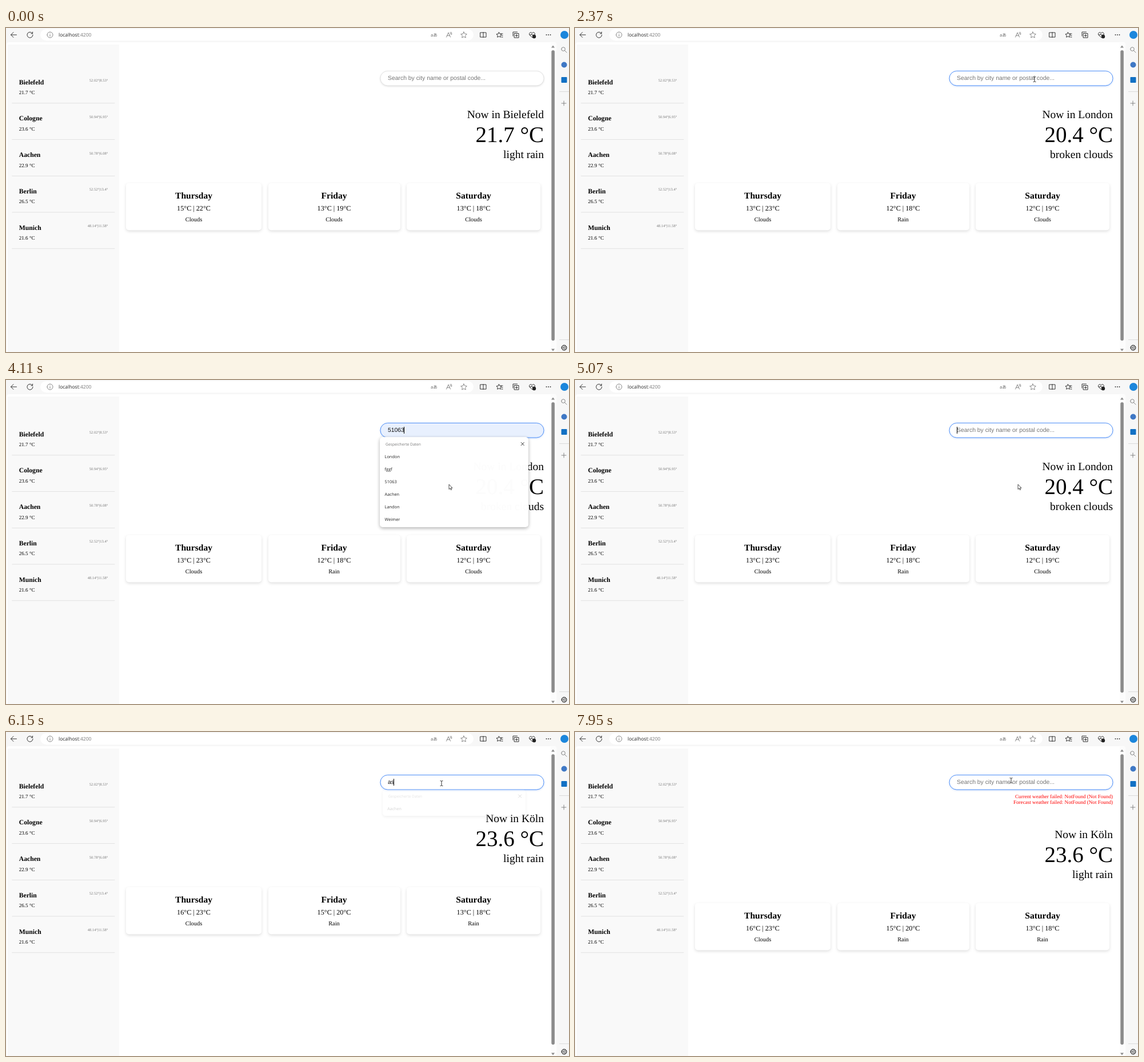
Write an HTML page that moves like this. It is 985 by 568 pixels and loops after 8 s.

```html
<!DOCTYPE html>
<html lang="en">
<head>
<meta charset="utf-8">
<title>Weather search</title>
<style>
html, body { margin: 0; width: 100%; height: 100%; overflow: hidden; background: #fff; }
svg { display: block; }
text { text-rendering: geometricPrecision; font-family: "Liberation Serif", "Times New Roman", serif; white-space: pre; }
.ui text { font-family: "Open Sans", "Noto Sans", sans-serif; }
#typed { font: 10.4px "Liberation Sans", Arial, sans-serif; }
.icon { fill: none; stroke: #333; stroke-width: 1; stroke-linecap: round; stroke-linejoin: round; }
.soft { stroke: #6b6b6b; stroke-width: .8; }
.end { text-anchor: end; }
.mid { text-anchor: middle; }
.card { fill: #fff; filter: drop-shadow(0 2.4px 2.4px rgba(0,0,0,.13)); }
#field { filter: drop-shadow(0 1.3px 1.8px rgba(0,0,0,.13)); stroke: #dcdcdc; stroke-width: .8; }
#field.focus { stroke: #4f8ff7; stroke-width: 1; filter: drop-shadow(0 1.3px 1.8px rgba(60,130,240,.28)); }
#panel { filter: drop-shadow(0 2.5px 3px rgba(0,0,0,.32)); }
</style>
</head>
<body>
<svg id="stage" width="985" height="568" viewBox="0 0 985 568"></svg>
<script>
const LOOP = 8000;
const CITIES = [
  ['Bielefeld', '21.7', '52.02°|8.53°'],
  ['Cologne', '23.6', '50.94°|6.95°'],
  ['Aachen', '22.9', '50.78°|6.08°'],
  ['Berlin', '26.5', '52.52°|13.4°'],
  ['Munich', '21.6', '48.14°|11.58°']
];
const CARDS = [['Thursday', 210, 447, 328.5], ['Friday', 459, 690, 574], ['Saturday', 701, 935, 818]];
const SAVED = ['London', 'fggf', '51063', 'Aachen', 'Landon', 'Weimer'];
const PROMPT = 'Search by city name or postal code...';

// Timelines: each entry holds from its first value (ms) on
const WEATHER = [
  [0, 'Bielefeld', '21.7', 'light rain', '15 22 Clouds', '13 19 Clouds', '13 18 Clouds'],
  [2280, 'London', '20.4', 'broken clouds', '13 23 Clouds', '12 18 Rain', '12 19 Clouds'],
  [5100, 'Köln', '23.6', 'light rain', '16 23 Clouds', '15 20 Rain', '13 18 Rain']
];
const TYPED = [
  [0, ''], [1380, 'L'], [1500, 'Lo'], [1620, 'Lon'], [1860, 'Lond'], [1950, 'Londo'], [2010, 'London'],
  [2250, ''], [4110, '51063'], [5070, ''], [6030, 'a'], [6090, 'as'], [6180, 'asd'], [6240, 'asdf'],
  [6300, 'asdfa'], [6450, 'asdfas'], [6570, 'asdfasdf'], [6690, 'asdfasdfa'], [6930, '']
];
const MOUSE = [
  [60, 941, 548], [600, 804, 90], [3600, 804, 90], [3630, 800, 103], [3900, 778, 205], [4080, 775, 183],
  [5310, 775, 183], [5640, 762, 90], [7200, 762, 90], [7920, 763, 85], [LOOP, 763, 85]
];
const OPEN = [[690, 2040], [3000, 4110], [5700, 6090]];
const FOCUS = 690, PICK = 4110, SUBMIT = 4590, FAIL = 7200, BLINK = 240;
const BLINK_STARTS = [750, SUBMIT, 5790, ...TYPED.filter(k => k[1]).map(k => k[0])].sort((a, b) => a - b);

const text = (x, y, size, str, attrs = '') => `<text x="${x}" y="${y}" font-size="${size}" ${attrs}>${str}</text>`;
const rect = (x, y, w, h, fill, r = 0, attrs = '') =>
  `<rect x="${x}" y="${y}" width="${w}" height="${h}" rx="${r}" fill="${fill}" ${attrs}/>`;
const icon = (x, y, d, cls = '') => `<path class="icon ${cls}" transform="translate(${x} ${y})" d="${d}"/>`;
const ring = r => `M${-r} 0a${r} ${r} 0 1 0 ${2 * r} 0a${r} ${r} 0 1 0 ${-2 * r} 0`;
const star = r => 'M' + Array.from({ length: 10 }, (_, i) => {
  const a = i * Math.PI / 5, q = i % 2 ? r * .5 : r;
  return `${(q * Math.sin(a)).toFixed(2)} ${(-q * Math.cos(a)).toFixed(2)}`;
}).join('L') + 'Z';

function browser() {
  return '<g class="ui">'
    + rect(0, 0, 985, 568, '#f7f7f7') + rect(1, 25, 962, 560, '#fff', 4)
    + rect(60, 2, 758, 20, '#fff', 10)
    + icon(13.5, 12, 'M5 0H-5M-.5-4.5L-5 0L-.5 4.5')
    + icon(42, 12, 'M4.2-2.6A5 5 0 1 0 5 0M4.6-5V-2.2H1.8')
    + icon(77, 12, ring(5) + 'M0-.5V2.5M0-2.6V-2.4', 'soft')
    + text(92, 15, 8.53, 'localhost<tspan fill="#777">:4200</tspan>', 'fill="#222"')
    + text(743, 15, 7.5, 'aあ', 'fill="#666" style="font-family:\'Noto Sans CJK JP\',\'Noto Sans\',sans-serif"')
    + icon(774.5, 12, 'M-4 4L-.5-4L3 4M-2.8 1.2H1.8M2.6-4.2Q4-3 3.4-1M4.2-5Q6-3 5.2-.4', 'soft')
    + icon(801, 12.5, star(5.6), 'soft')
    + icon(835, 12, 'M-5-4H5V4H-5ZM0-4.5V4.5')
    + icon(862.5, 12.3, star(4.8)) + icon(867, 12, 'M-1.5-2H2M-.5 1H2M0 4H2')
    + icon(892, 12, 'M-2.5-2.5H5V5H-2.5ZM-5 2V-5H2.5M1.2-.8V3.3M-.8 1.2H3.3')
    + icon(920.5, 12, 'M0 4.5L-4.6 0C-6.4-3-2-6.4 0-2.8C2-6.4 6.4-3 4.6 0ZM-4.5 0H-2L-.8-2L1 1.5L2 0H4')
    + '<circle cx="924" cy="15" r="3.2" fill="#222"/>'
    + [945.5, 949, 952.5].map(x => `<circle cx="${x}" cy="12" r=".9" fill="#333"/>`).join('')
    + '<circle cx="977" cy="12" r="7" fill="#1c86dc"/>'
    + icon(975, 37, ring(3.3) + 'M2.4 2.4L6 6', 'soft')
    + '<circle cx="976.5" cy="64.5" r="5" fill="#3f78c5"/>' + rect(971.5, 86, 10, 10, '#1170c4', 1)
    + rect(968, 111, 17, .8, '#d5d5d5') + rect(968, 546, 17, .8, '#d5d5d5')
    + icon(976, 132, 'M-4 0H4M0-4V4', 'soft')
    + icon(976.5, 560.5, ring(1.7))
    + `<path class="icon" transform="translate(976.5 560.5)" stroke-dasharray="2.1 1.5" stroke-width="1.6" d="${ring(4.6)}"/>`
    + icon(976.5, 560.5, ring(3.9))
    + rect(953, 26, 9.5, 542, '#fcfcfc') + rect(954.3, 39, 5.6, 509, '#8b8b8b', 2.8)
    + '<path fill="#8b8b8b" d="M954 34.5L957 30.5L960 34.5ZM954 562.5L957 566.5L960 562.5Z"/></g>';
}

function sidebar() {
  return rect(3, 29, 195, 539, '#f9f9f9') + CITIES.map(([name, temp, place], i) =>
    `<g transform="translate(0 ${i * 63.75})">`
    + text(22.7, 98.5, 11.7, name, 'font-weight="bold"')
    + text(22.7, 116, 9.1, temp + ' °C')
    + text(178.3, 94, 6.5, place, 'class="end" fill="#777"')
    + rect(10.4, 131.4, 180, .8, '#dcdcdc') + '</g>').join('');
}

function forecast() {
  return '<g id="report">'
    + text(941, 158, 19.5, '', 'class="end" id="city"')
    + text(941, 200, 39, '', 'class="end" id="temp"')
    + text(941, 228, 19.5, '', 'class="end" id="sky"')
    + CARDS.map(([day, left, right, mid], i) =>
      rect(left, 272, right - left, 82.5, '#fff', 5, 'class="card"')
      + text(mid, 299, 15.6, day, 'class="mid" font-weight="bold"')
      + text(mid, 320, 12.17, '', `class="mid" id="range${i}"`)
      + text(mid, 339.3, 10.4, '', `class="mid" id="cond${i}"`)).join('') + '</g>'
    + '<g id="errors" fill="red">'
    + text(941, 115.6, 9.1, 'Current weather failed: NotFound (Not Found)', 'class="end"')
    + text(941, 126.3, 9.1, 'Forecast weather failed: NotFound (Not Found)', 'class="end"') + '</g>';
}

function search() {
  return rect(655, 75.4, 286, 25.6, '#fff', 12.8, 'id="field"')
    + text(668, 91.3, 10.4, '', 'id="typed"') + rect(668, 82, 1, 12, '#000', 0, 'id="caret"')
    + '<g class="ui" id="menu">' + rect(654, 100, 260, 48, '#fff', 5, 'id="panel"')
    + rect(654, 0, 260, 22, '#efefef', 0, 'id="hover"')
    + text(664, 114.6, 6.7, 'Gespeicherte Daten', 'fill="#767676"')
    + icon(903.8, 112, 'M-2.6-2.6L2.6 2.6M2.6-2.6L-2.6 2.6')
    + SAVED.map((_, i) => text(662.5, 137.2 + 22 * i, 7.4, '', `id="item${i}" fill="#222"`)).join('') + '</g>';
}

const pointers =
  '<path id="arrow" fill="#fff" stroke="#222" stroke-width=".8" stroke-linejoin="round" d="M0 0V8.6L2 6.8L3.4 9.8L4.7 9.2L3.4 6.3H6Z"/>'
  + '<path id="beam" class="icon" d="M-2-4.5Q0-4.5 0-3.4Q0-4.5 2-4.5M0-3.4V3.4M-2 4.5Q0 4.5 0 3.4Q0 4.5 2 4.5"/>';

document.getElementById('stage').innerHTML = browser() + sidebar() + forecast() + search() + pointers;

const $ = id => document.getElementById(id);
const show = (id, on) => $(id).style.display = on ? '' : 'none';
const setText = (id, str) => { if ($(id).textContent !== str) $(id).textContent = str; };
const at = (line, t) => line.filter(k => k[0] <= t).pop();
const clamp = v => Math.min(1, Math.max(0, v));

function mouseAt(t) {
  const i = Math.max(1, MOUSE.findIndex(k => k[0] > t));
  const [t0, x0, y0] = MOUSE[i - 1], [t1, x1, y1] = MOUSE[i];
  const p = clamp((t - t0) / (t1 - t0)), e = p * p * (3 - 2 * p);
  return [x0 + (x1 - x0) * e, y0 + (y1 - y0) * e];
}

function drawWeather(t) {
  const [, city, temp, sky, ...days] = at(WEATHER, t);
  setText('city', 'Now in ' + city);
  setText('temp', temp + ' °C');
  setText('sky', sky);
  days.forEach((day, i) => {
    const [low, high, cond] = day.split(' ');
    setText('range' + i, `${low}°C | ${high}°C`);
    setText('cond' + i, cond);
  });
  show('errors', t >= FAIL);
  $('report').setAttribute('transform', `translate(0 ${t >= FAIL ? 28 : 0})`);
}

// Draws the saved entries and returns the one under the pointer
function drawMenu(t, overField, y) {
  const span = at(OPEN, t);
  const fade = span ? Math.min(clamp((t - span[0] + 30) / 90), 1 - clamp((t - span[1]) / 75)) : 0;
  show('menu', fade > 0);
  if (!fade) return;
  const query = at(TYPED, Math.min(t, span[1] - 1))[1].toLowerCase();
  const list = SAVED.filter(s => s.toLowerCase().startsWith(query));
  const height = 26 + 22 * list.length, mid = 100 + height / 2;
  $('panel').setAttribute('height', height);
  $('menu').setAttribute('opacity', fade);
  $('menu').setAttribute('transform', `translate(784 ${mid}) scale(${1 - .048 * (1 - fade)}) translate(-784 ${-mid})`);
  SAVED.forEach((_, i) => setText('item' + i, list[i] || ''));
  const row = overField || t >= span[1] ? -1 : Math.floor((y - 123.5) / 22);
  const hit = list[row];
  show('hover', hit);
  if (hit) $('hover').setAttribute('y', 123.5 + 22 * row);
  return t < span[1] ? hit : undefined;
}

function drawField(t, preview) {
  const value = preview || at(TYPED, t)[1];
  const filled = preview || (t >= PICK && t < SUBMIT);
  $('field').setAttribute('class', t >= FOCUS ? 'focus' : '');
  $('field').setAttribute('fill', filled ? '#e8f0fe' : '#fff');
  setText('typed', value || PROMPT);
  $('typed').setAttribute('fill', value ? '#111' : '#757575');
  const start = BLINK_STARTS.filter(s => s <= t).pop() || BLINK_STARTS[0];
  show('caret', t >= FOCUS && !preview && (t - start) % (2 * BLINK) < BLINK);
  $('caret').setAttribute('x', 668 + (value ? Math.floor($('typed').getComputedTextLength()) : 0));
}

function draw() {
  const t = performance.now() % LOOP;
  const [x, y] = mouseAt(t);
  const overField = x > 655 && x < 941 && y > 75 && y < 101;
  drawWeather(t);
  drawField(t, drawMenu(t, overField, y));
  show('arrow', t >= 60 && !overField);
  show('beam', t >= 60 && overField);
  $(overField ? 'beam' : 'arrow').setAttribute('transform', `translate(${x} ${y})`);
  requestAnimationFrame(draw);
}
draw();
</script>
</body>
</html>
```
